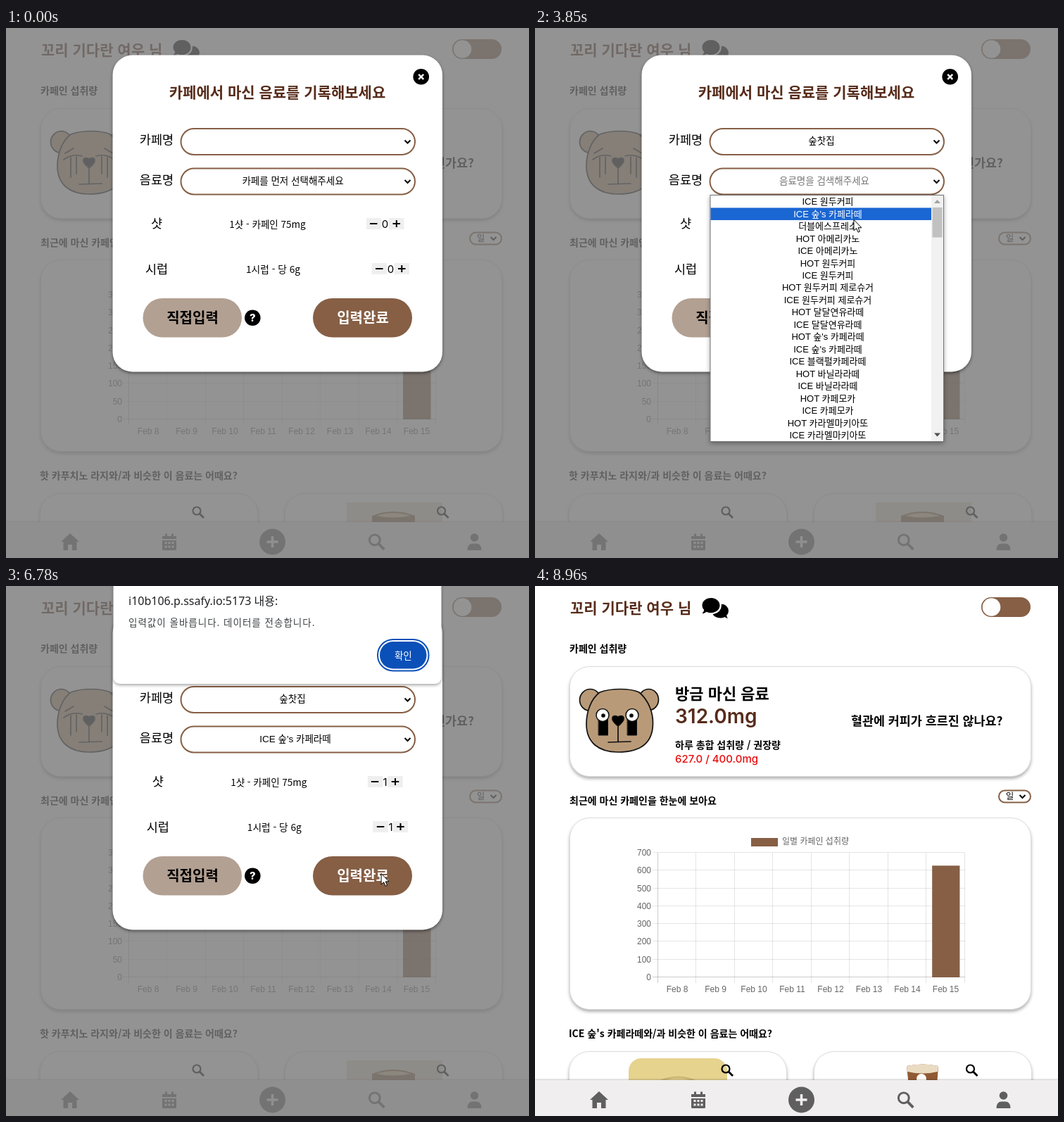
Write an HTML page that moves like this. It is 743x753 px and loops after 9.56 s.

```html
<!DOCTYPE html>
<html lang="ko">
<head>
<meta charset="utf-8">
<title>카페인 기록</title>
<style>
html, body { margin: 0; width: 100%; height: 100%; overflow: hidden; background: #fff; }
svg { display: block; }
text { font-family: 'Noto Sans CJK KR', 'Noto Sans CJK', sans-serif; font-size: 14px; }
.num { font-family: Inter, 'Noto Sans CJK KR', sans-serif; }
.chart text { font-family: 'Liberation Sans', 'Noto Sans CJK KR', sans-serif; font-size: 12px; fill: #666; }
.field { font-family: 'Liberation Sans', 'Noto Sans CJK KR', sans-serif; font-size: 13.5px; }
.list text { font-family: 'Liberation Sans', 'Noto Sans CJK KR', sans-serif; font-size: 13px; text-anchor: middle; }
.list text.hot { fill: #fff; }
.mid { text-anchor: middle; }
.end { text-anchor: end; }
.b { font-weight: 600; }
.brown { fill: #572c1b; }
.card { fill: #fff; stroke: #dcdcdc; filter: drop-shadow(0 3px 2px rgba(0,0,0,.3)); }
.pill { fill: #fff; stroke: #865f45; stroke-width: 2; }
.focus { fill: none; stroke: #000; stroke-width: 2; }
.chev { fill: none; stroke: #000; stroke-width: 2; }
.label { font-size: 17.5px; text-anchor: middle; }
.right { transform: translateX(var(--d)); }
.left { transform: translateX(calc(0px - var(--d))); }
.sign { stroke: #000; stroke-width: 2; }
.key { fill: #efefef; }
.popup { fill: #fff; stroke: #767676; filter: drop-shadow(0 2px 3px rgba(0,0,0,.35)); }
</style>
</head>
<body>
<svg width="743" height="753" viewBox="0 0 743 753">
  <defs>
    <g id="lens" fill="none" stroke="currentColor"><circle cx="-2" cy="-2" r="5.5" stroke-width="2.2"/><path d="M2 2L8 8" stroke-width="2.8"/></g>
    <path id="chevron" class="chev" d="M-4-2L0 2 4-2"/>
  </defs>
  <rect width="743" height="753" fill="#fff"/>

  <g data-on="0-7550 7830-9560">
    <text class="b brown" x="50" y="39" style="font-size:21px">꼬리 기다란 여우 님</text>
    <path d="M250 17C257 17 262.500 21.500 262.500 27.500S257 38 250 38C247.500 38 245.500 37.500 243.500 36.700C241.500 38.300 239.500 39 237.500 39C239 37.500 240 35.500 240.200 33.800C238.500 32 237.500 30 237.500 27.500C237.500 21.500 243 17 250 17Z"/>
    <path d="M264 25C271 25 275.500 30 275.500 35.500C275.500 38 274.500 40.500 272.800 42C273 44 274 45.500 275.500 47C273.500 47 271.300 46.200 269.500 44.700C267.500 45.500 266 46 263.500 46C258 46 253.500 43.500 251.500 39.500C260 39 265.500 33 264 25Z" stroke="#fff" stroke-width="1.200"/>
    <rect x="635" y="17" width="68" height="26" rx="13" fill="#865f45" stroke="#865f45" stroke-width="2"/>
    <circle cx="648.500" cy="30" r="12.800" fill="#fff"/>

    <rect class="card" x="49.500" y="114.500" width="655" height="156" rx="28"/>
    <g stroke="#111" stroke-width="1.700" stroke-linejoin="round" stroke-linecap="round">
      <g fill="#b99a78">
        <ellipse cx="78.500" cy="162" rx="15" ry="15.500"/><ellipse cx="161.500" cy="161.500" rx="14" ry="15"/>
        <path d="M92 151C108 145 135 145 148 151C162 163 168 181 167.500 196C167 225 148 236 118 236C90 236 73 222 73 196C73 178 80 160 92 151Z"/>
      </g>
      <path d="M118 200V221M104 222L136 221" fill="none"/>
      <path d="M118 199C113 195 109 191 110 187C111 184 115 184 118 186C121 184 125 184 126 187C127 191 123 195 118 199Z"/>
      <path data-on="0-7550" d="M82 187Q94 178 108 182M128 182Q142 178 154 187M92 184V212M100 183V207M136 183V207M144 184V212M84 178L96 171M140 171L152 178" fill="none"/>
      <g data-on="7830-9560">
        <path d="M90.500 188H103.500V212H90.500ZM131.500 188H144.500V212H131.500Z" stroke-width="1"/>
        <g fill="#fff" stroke-width="1.500"><circle cx="96" cy="183.500" r="9"/><circle cx="138" cy="183.500" r="9"/></g>
        <circle cx="97" cy="184" r="2"/><circle cx="137" cy="184" r="2"/>
      </g>
    </g>
    <text class="b end" data-on="0-7550" x="665" y="198" style="font-size:17.400px">괜찮으신가요?</text>
    <g data-on="7830-9560">
      <text class="b" x="199" y="160.500" style="font-size:22px">방금 마신 음료</text>
      <text class="b brown num" x="199" y="194.500" style="font-size:28px">312.0mg</text>
      <text class="b" x="449" y="198" style="font-size:17.400px">혈관에 커피가 흐르진 않나요?</text>
    </g>

    <rect class="pill" x="659" y="290.500" width="45" height="17" rx="8.500"/>
    <text class="mid" x="674.500" y="303" style="font-size:12.500px">일</text>
    <use href="#chevron" x="692.500" y="299"/>

    <g data-on="0-7550 8180-9560">
      <text class="b" x="49" y="94">카페인 섭취량</text>
      <text class="b" x="49" y="309.500">최근에 마신 카페인을 한눈에 보아요</text>
    </g>
    <g data-on="8180-9560">
      <text class="b" x="199" y="231">하루 총합 섭취량 / 권장량</text>
      <text class="num" x="199" y="251" fill="#e80c0c" style="font-size:15px;font-weight:500">627.0 / 400.0mg</text>
      <text class="b" x="48" y="641">ICE 숲's 카페라떼와/과 비슷한 이 음료는 어때요?</text>
    </g>
    <text class="b" data-on="0-7550" x="48" y="641">핫 카푸치노 라지와/과 비슷한 이 음료는 어때요?</text>

    <rect class="card" x="49.500" y="329.500" width="655" height="272" rx="28"/>
    <g class="chart" id="chart">
      <rect x="307" y="358" width="38" height="12" fill="#865f45"/>
      <text x="351" y="367">일별 카페인 섭취량</text>
      <g id="oldTicks" data-on="0-7550"></g>
      <g id="newTicks" data-on="7830-9560"></g>
      <rect data-on="0-7550" x="564" y="397" width="39.500" height="159" fill="#865f45"/>
      <rect id="bar" fill="#865f45"/>
    </g>

    <g id="drinks">
      <rect class="card" x="48.500" y="661.500" width="309" height="130" rx="28"/>
      <rect class="card" x="396.500" y="661.500" width="309" height="130" rx="28"/>
      <g data-on="0-7550">
        <rect x="484" y="674" width="136" height="60" fill="#e9dcc8"/>
        <path d="M520 704V693Q550 681 581 693V704Z" fill="#8a6243"/><path d="M526 693Q550 685 575 693Q550 698 526 693Z" fill="#d9bd98"/>
      </g>
      <g data-on="8400-9560">
        <rect x="133" y="671" width="140" height="80" rx="18" fill="#e6d38e"/>
        <path d="M176 704Q203 692 230 704" fill="none" stroke="#cdb878" stroke-width="3"/>
        <path d="M528 682Q551 677 573 682L571 710H531Z" fill="#8f5a33"/><path d="M528 682Q551 677 573 682L572 690Q551 695 529 690Z" fill="#eadcc3"/>
        <circle cx="549" cy="700" r="7" fill="#fff"/>
      </g>
      <use href="#lens" x="273" y="688"/><use href="#lens" x="620.500" y="688"/>
    </g>
  </g>

  <rect y="702" width="743" height="51" fill="#f1eeef" style="filter:drop-shadow(0 -1px 1px rgba(0,0,0,.22))"/>
  <g fill="#5f5f5f" color="#5f5f5f">
    <path d="M91 718L104 730H100.500V742H94V734H88V742H81.500V730H78Z"/>
    <path d="M222 722H242V726H222ZM222 728H242V741Q242 742 240 742H224Q222 742 222 741ZM226 718.500H229V723H226ZM235 718.500H238V723H235Z"/>
    <path d="M225.500 731.500H238.500M225.500 737H238.500" stroke="#f1eeef" stroke-width="2.800" stroke-dasharray="3 2"/>
    <circle cx="378.500" cy="730" r="18.500"/>
    <path d="M370.500 730H386.500M378.500 722V738" stroke="#f1eeef" stroke-width="3.500"/>
    <use href="#lens" transform="translate(526.500 730) scale(1.350)"/>
    <circle cx="665.500" cy="724" r="5.800"/><path d="M655.500 742Q655.500 732.500 663 732.500H668Q675.500 732.500 675.500 742Z"/>
  </g>

  <g data-on="0-7550">
    <rect width="743" height="753" fill="#797979" fill-opacity=".8"/>
    <rect x="151.500" y="38.500" width="468.500" height="450" rx="28" fill="#fff" style="filter:drop-shadow(0 2px 2px rgba(0,0,0,.45))"/>
    <text class="b brown mid" x="385.500" y="98.500" style="font-size:21px">카페에서 마신 음료를 기록해보세요</text>
    <circle cx="589.700" cy="69.300" r="11.300"/><path d="M586.200 65.800L593.200 72.800M593.200 65.800L586.200 72.800" stroke="#fff" stroke-width="2.400"/>

    <text class="label" x="214" y="165">카페명</text>
    <text class="label" x="214" y="221.500">음료명</text>
    <rect class="pill" x="248.500" y="143" width="332.500" height="37" rx="18.500"/>
    <rect class="pill" x="248.500" y="199.500" width="332.500" height="37" rx="18.500"/>
    <rect class="focus" data-on="2550-3030" x="248.500" y="143" width="332.500" height="37" rx="18.500"/>
    <rect class="focus" data-on="4320-5150" x="248.500" y="199.500" width="332.500" height="37" rx="18.500"/>
    <use href="#chevron" x="570.500" y="161.500"/><use href="#chevron" x="570.500" y="218"/>
    <text class="field mid" data-on="2550-7550" x="407" y="165">숲찻집</text>
    <text class="field mid" data-on="0-2550" x="407.500" y="221.500">카페를 먼저 선택해주세요</text>
    <text class="field mid" data-on="2550-4320" x="411" y="222" fill="#757575">음료명을 검색해주세요</text>
    <text class="field mid" data-on="4320-7550" x="411" y="222">ICE 숲's 카페라떼</text>

    <g id="shot">
      <text class="label right" x="214" y="284">샷</text>
      <text class="mid right" x="371.500" y="283.500" style="font-size:13.500px">1샷 - 카페인 75mg</text>
      <g class="right"><rect class="key" x="512" y="270" width="21.500" height="16"/><path class="sign" d="M517 278H527.500"/></g>
      <g class="left"><rect class="key" x="544" y="270" width="21.500" height="16"/><path class="sign" d="M549.500 278H560M554.800 273V283"/></g>
      <text class="count num mid" x="538.500" y="283.500" style="font-size:15px">0</text>
    </g>
    <g id="syrup">
      <text class="label right" x="214" y="348.500">시럽</text>
      <text class="mid right" x="379.500" y="347.500" style="font-size:13.700px">1시럽 - 당 6g</text>
      <g class="right"><rect class="key" x="519.500" y="334" width="21.500" height="16"/><path class="sign" d="M525 342H535.500"/></g>
      <g class="left"><rect class="key" x="551.500" y="334" width="21.500" height="16"/><path class="sign" d="M557 342H567.500M562.300 337V347"/></g>
      <text class="count num mid" x="546.500" y="347.500" style="font-size:15px">0</text>
    </g>

    <rect x="194.500" y="384" width="140.500" height="55.500" rx="27.700" fill="#b2a092"/>
    <text class="b mid" x="265" y="419" style="font-size:20px">직접입력</text>
    <circle cx="350.300" cy="411.700" r="11.300"/>
    <text class="num mid" x="350.300" y="417" fill="#fff" style="font-size:15px;font-weight:800">?</text>
    <rect x="436" y="384" width="141" height="55.500" rx="27.700" fill="#865f45"/>
    <text class="b mid" x="507" y="419" fill="#fff" style="font-size:20px">입력완료</text>
  </g>

  <g class="list" id="cafes" data-on="740-2550">
    <rect class="popup" x="249" y="180" width="331.500" height="263"/>
  </g>
  <g class="list" id="menu" data-on="3030-4320">
    <rect class="popup" x="249" y="237.500" width="331.500" height="350"/>
    <rect x="563" y="238" width="17" height="349" fill="#f1f1f1"/>
    <rect x="564.500" y="255" width="14" height="42.500" fill="#c1c1c1"/>
    <path d="M567 249L571.500 244 576 249Z" fill="#a0a0a0"/><path d="M567 575.500L571.500 580.500 576 575.500Z" fill="#505050"/>
  </g>

  <g data-on="6640-7480">
    <rect x="152.500" y="-20" width="466" height="159" rx="9" fill="#fff" style="filter:drop-shadow(0 2px 2px rgba(0,0,0,.35))"/>
    <text x="174" y="26.500" fill="#202124" style="font-family:'Noto Sans','Noto Sans CJK KR',sans-serif;font-size:16px">i10b106.p.ssafy.io:5173 내용:</text>
    <text x="174" y="57" fill="#3c4043" style="font-size:13.500px;letter-spacing:1px">입력값이 올바릅니다. 데이터를 전송합니다.</text>
    <rect x="528" y="76" width="72.500" height="44.500" rx="22" fill="#fff" stroke="#0b50b8" stroke-width="2"/>
    <rect x="531" y="79" width="66.500" height="38.500" rx="19" fill="#0b50b8"/>
    <text class="mid" x="564.300" y="103.500" fill="#fff" style="font-size:13.500px">확인</text>
  </g>

  <path id="cursor" d="M0 0V15.500L3.600 12.300 6.100 17.800 8.500 16.800 6.100 11.400H11Z" fill="#fff" stroke="#000"/>
</svg>
<script>
const LOOP = 9560, ROW = 17.47, COLUMN = 54.5;
const $ = id => document.getElementById(id);

function add(parent, tag, attrs, text = '') {
  const el = document.createElementNS('http://www.w3.org/2000/svg', tag);
  for (const k in attrs) el.setAttribute(k, attrs[k]);
  el.textContent = text;
  parent.append(el);
  return el;
}

// Chart grid and axis labels
for (let i = 0; i <= 8; i++) {
  const x = Math.floor(175 + COLUMN * i) - .5;
  add($('chart'), 'path', { d: `M${x} 379V564`, stroke: '#000', 'stroke-opacity': i ? .1 : .2 });
  if (i < 8) add($('chart'), 'text', { x: 202 + COLUMN * i, y: 577, class: 'mid' }, `Feb ${8 + i}`);
}
for (let i = 0; i <= 7; i++) {
  const y = 556 - 25.3 * i;
  add($('chart'), 'path', { d: `M167 ${Math.round(y) - .5}H611`, stroke: '#000', 'stroke-opacity': i ? .1 : .2 });
  add($('oldTicks'), 'text', { x: 165, y: y + 4, class: 'end' }, 50 * i);
  add($('newTicks'), 'text', { x: 165, y: y + 4, class: 'end' }, 100 * i);
}
$('chart').append($('bar'));

// Option lists
function makeList(id, top, width, center, items) {
  const mark = add($(id), 'rect', { x: 249.5, width, height: ROW, fill: '#1a66d2' });
  const rows = items.map((s, i) => add($(id), 'text', { x: center, y: top + ROW * i + 13.2 }, s));
  return y => {
    const hot = Math.floor((y - top) / ROW);
    mark.setAttribute('y', top + ROW * hot);
    mark.setAttribute('opacity', rows[hot] ? 1 : 0);
    rows.forEach((row, i) => row.classList.toggle('hot', i === hot));
  };
}
const hoverCafe = makeList('cafes', 180.3, 330.5, 425, ['구름마루', '들꽃커피', '하늘빛테라스', '노을빛커피', '숲찻집',
  '나래울', '모로니', '원두뜰', '벨로나띠', '루미넬', '온도담', '소나기커피', '달빛창가', '돌고래커피', '잎샘']);
const both = s => [`HOT ${s}`, `ICE ${s}`];
const hoverMenu = makeList('menu', 238, 313.5, 416, ['ICE 원두커피', "ICE 숲's 카페라떼", '더블에스프레소',
  ...both('아메리카노'), ...both('원두커피'), ...both('원두커피 제로슈거'), ...both('달달연유라떼'),
  ...both("숲's 카페라떼"), 'ICE 블랙펄카페라떼', ...both('바닐라라떼'), ...both('카페모카'), ...both('카라멜마키아또')]);

// Pointer path: time, x, y
const path = [
  [70, 650, 649], [740, 545, 156], [940, 545, 156], [1290, 470, 247], [1680, 470, 247], [1750, 468, 251],
  [1820, 463, 253], [2150, 463, 253], [2220, 463, 254], [2500, 463, 254], [2830, 531, 224], [3160, 531, 224],
  [3560, 480, 294], [3990, 440, 262], [4270, 440, 262], [4790, 561, 290], [4940, 561, 290], [5150, 556, 280],
  [5250, 556, 280], [5560, 564, 336], [5820, 564, 336], [6250, 525, 415], [6500, 533, 409], [6780, 533, 409],
  [7400, 563, 98], [7830, 563, 98], [8040, 565, 171], [8740, 690, 715], [8960, 700, 754]
];
function pointer(t) {
  const n = path.findIndex(p => p[0] > t);
  if (n < 1) return n ? path.at(-1).slice(1) : path[0].slice(1);
  const [t0, x0, y0] = path[n - 1], [t1, x1, y1] = path[n];
  const k = (t - t0) / (t1 - t0);
  return [x0 + (x1 - x0) * k, y0 + (y1 - y0) * k];
}

function setCount(id, n) {
  $(id).style.setProperty('--d', n ? '1.8px' : '0px');
  $(id).querySelector('.count').textContent = n;
}

function drawBar(t) {
  const p = 1 - (1 - Math.min(1, Math.max(0, (t - 7998) / 1000))) ** 4;
  const mix = (a, b) => a + (b - a) * p;
  const width = mix(158.6, COLUMN * .72), height = mix(0, 158.7);
  const box = { x: mix(280, 583.8) - width / 2, y: 556 - height, width, height };
  for (const k in box) $('bar').setAttribute(k, box[k]);
}

const timed = [...document.querySelectorAll('[data-on]')].map(el =>
  [el, el.dataset.on.split(' ').map(span => span.split('-').map(Number))]);

function frame() {
  const t = performance.now() % LOOP;
  for (const [el, spans] of timed) el.style.display = spans.some(([a, b]) => t >= a && t < b) ? '' : 'none';
  const [x, y] = pointer(t);
  $('cursor').setAttribute('transform', `translate(${x} ${y})`);
  $('cursor').style.display = t < 70 || t >= 8960 ? 'none' : '';
  hoverCafe(y);
  hoverMenu(y);
  setCount('shot', t >= 5150 ? 1 : 0);
  setCount('syrup', t >= 5630 ? 1 : 0);
  drawBar(t);
  $('drinks').setAttribute('transform', `translate(0 ${t >= 7830 && t < 8180 ? 2 : 0})`);
  requestAnimationFrame(frame);
}
frame();
</script>
</body>
</html>
```
